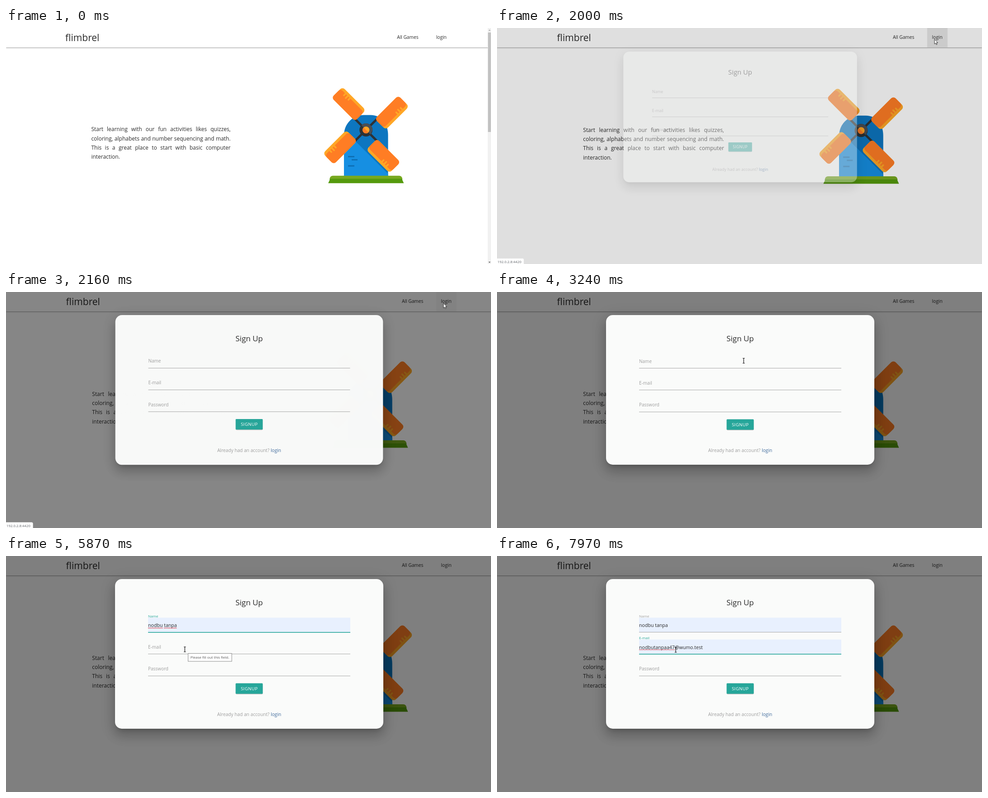
An HTML page for the animation above (8 s loop, 1072x522 px).

```html
<!DOCTYPE html>
<html lang="en">
<head>
<meta charset="utf-8">
<title>Sign up</title>
<style>
html, body { margin: 0; width: 100%; height: 100%; overflow: hidden; background: #fff; }
body { position: relative; font-family: "Open Sans", "Noto Sans", sans-serif; }
svg, #dim { position: absolute; left: 0; top: 0; width: 1072px; height: 522px; }
svg text { font-size: 10.2px; fill: #2a2a2a; white-space: pre; }
#nav {
  position: absolute; left: 0; top: 0; width: 1072px; height: 42.7px; background: #fff;
  box-shadow: 0 1.3px 1.3px rgba(0,0,0,.14), 0 2px .7px -1.3px rgba(0,0,0,.12), 0 .7px 3.3px rgba(0,0,0,.2);
}
#para div { font-size: 12px; line-height: 20.2px; color: #2a2a2a; white-space: nowrap; text-align-last: justify; }
#para div:last-child { text-align-last: left; }
#dim { background: #000; }
#modal {
  position: absolute; left: 240.5px; top: 50.5px; width: 593px; height: 331.5px;
  background: #fafbfa; border-radius: 15px;
  box-shadow: 0 16px 25px 2px rgba(0,0,0,.14), 0 6px 31px 5px rgba(0,0,0,.12), 0 7px 10px -5px rgba(0,0,0,.2);
}
#modal svg { width: 593px; height: 331.5px; }
.drop { filter: drop-shadow(0 1px 1px rgba(0,0,0,.35)); }
.drop text { font-size: 8.3px; font-weight: 600; fill: #222; }
</style>
</head>
<body>
<div id="nav"></div>
<svg viewBox="0 0 1072 522">
  <text id="brand" y="29" style="font-size:21px">flimbrel</text>
  <g id="links">
    <rect id="hover" x="940" width="45" height="42.7"/>
    <text x="864.2" y="24">All Games</text>
    <text x="950.7" y="24">login</text>
  </g>
  <foreignObject id="para" height="90">
    <div>Start learning with our fun activities likes quizzes,</div>
    <div>coloring, alphabets and number sequencing and math.</div>
    <div>This is a great place to start with basic computer</div>
    <div>interaction.</div>
  </foreignObject>
  <g id="mill">
    <path fill="#0d76c0" d="M747 328V237C747 212 766 192.5 791 192.5H806C830 192.5 844.5 212 844.5 237V328Z"/>
    <path fill="#168fe2" d="M747 262L768 246L844.5 322.5V328H747Z"/>
    <path stroke="#0d6fb5" stroke-width="3" d="M756 284.5H770M764 291.5H777M756 305H770"/>
    <rect x="715.5" y="326.7" width="160.5" height="14" rx="7" fill="#78a920"/>
    <path fill="#559a0d" d="M715.5 333.5H876V336L879.3 343.3H712.2L715.5 336Z"/>
    <g transform="translate(795.7 225.5)">
      <path stroke="#2d3236" stroke-width="5" d="M-25-25L25 25M-25 25L25-25"/>
      <g id="blades"></g>
      <circle r="14.5" fill="#2d3236"/>
      <path fill="#4b4f54" d="M-10.2-10.2A14.5 14.5 0 0 1 14.5 0L10.2 10.2Z"/>
      <circle r="7.6" fill="#ffa726"/>
      <path fill="#ff7d24" d="M-5.4-5.4A7.6 7.6 0 0 0 5.4 5.4Z"/>
    </g>
  </g>
  <g id="bar">
    <rect x="1064.7" width="8" height="522" fill="#f1f1f1"/>
    <rect x="1065.3" y="10" width="6.4" height="220" fill="#c1c1c1"/>
    <path fill="#a3a3a3" d="M1066.5 6H1071L1068.7 3.5Z"/>
    <path fill="#505050" d="M1066.5 517H1071L1068.7 519.5Z"/>
  </g>
</svg>
<div id="dim"></div>
<div id="modal">
  <svg viewBox="240.5 50.5 593 331.5">
    <text x="537" y="108.5" text-anchor="middle" style="font-size:17px">Sign Up</text>
    <g id="fields"></g>
    <rect x="507.5" y="282.5" width="59.5" height="23" rx="2" fill="#000" opacity=".22"/>
    <rect x="507" y="281" width="60" height="23.3" rx="1.5" fill="#26a69a"/>
    <text x="537.2" y="296.5" text-anchor="middle" style="font-size:9.8px;fill:#fff;letter-spacing:.33px">SIGNUP</text>
    <text x="537" y="353.7" text-anchor="middle" style="fill:#9e9e9e">Already had an account? <tspan fill="#3f6a9c">login</tspan></text>
  </svg>
</div>
<svg viewBox="0 0 1072 522">
  <g id="drops"></g>
  <g id="tip">
    <rect x="402.5" y="215.5" width="96.5" height="17.5" fill="#fff" stroke="#8a8a8a"/>
    <text x="407.7" y="227.3" style="font-size:8px;fill:#575757">Please fill out this field.</text>
  </g>
  <g id="status">
    <path d="M-1 523V509.5H56.5Q59.5 509.5 59.5 512.5V523Z" fill="#fff" stroke="#dedede" stroke-width=".7"/>
    <text x="1" y="519.8" style="font-size:7.8px;fill:#5f6368">192.0.2.8:4420</text>
  </g>
  <path id="arrow" fill="#fff" stroke="#222" stroke-width=".9" d="M0 0V10.5L2.5 8.3L4.2 12L5.8 11.2L4.2 7.6H7.4Z"/>
  <path id="beam" fill="none" stroke="#111" stroke-width="1.2" d="M-2.3-5.5H2.3M-2.3 5.5H2.3M0-5.5V5.5"/>
</svg>
<script>
const $ = id => document.getElementById(id);
const clamp = v => Math.max(0, Math.min(1, v));
const ramp = (t, from, ms) => clamp((t - from) / ms);
const show = (el, on) => el.style.display = on ? "" : "none";
const set = (el, attrs) => { for (const k in attrs) el.setAttribute(k, attrs[k]); };

const LOOP = 8000, OPEN = 1967, TEAL = "#26a69a", GREY = "#9e9e9e";
const ROW = 25.25;

// hot spot of the pointer: time, x, y
const path = [
  [370, 1009, 522], [560, 985, 300], [820, 957, 60], [1070, 957, 60], [1680, 967, 25],
  [2190, 967, 25], [2610, 590, 240], [2860, 590, 240], [3240, 545.3, 152],
  [3900, 545.3, 152], [4240, 380, 207], [4480, 380, 207], [4710, 385, 184],
  [5330, 385, 184], [5710, 395.3, 206.5], [6490, 395.3, 206.5], [6880, 395.5, 233],
  [7720, 395.5, 233], [7960, 395, 207.5]
];

// y: top of the input; words: ranges underlined by the spell checker
const fields = [
  { label: "Name", y: 136, focus: 3560, list: 3640, pick: 5020, blur: 5940, words: [[0, 5], [6, 5]],
    items: ["nodbu tanpa", "zom", "vebu", "zoma vebu", "po", "zui"] },
  { label: "E-mail", y: 184.2, focus: 5940, list: 6000, pick: 7190, blur: LOOP, words: [[0, 13]],
    items: ["nodbutanpaa47@wumo.test", "zomvebu12@wumo.test", "vebu.zom@wumo.test",
            "zui305@wumo.test", "nodbu8@wumo.test", "po.zui@wumo.test"] },
  { label: "Password", y: 232.7, focus: Infinity, list: Infinity, pick: Infinity, blur: Infinity, words: [], items: [] }
];

$("blades").innerHTML = [0, 90, 180, 270].map(a => `
  <g transform="rotate(${a}) translate(-38.2 -57.5) rotate(45)">
    <rect x="-36.5" y="-17" width="73" height="34" rx="7.5" fill="#ffa726"/>
    <rect x="-36.5" y="-11" width="73" height="28" rx="6.5" fill="#ff7d24"/>
    <path d="M-21-12V-6M-14-12V-4.5M-7-12V-6" stroke="#ffa726" stroke-width="3.6" stroke-linecap="round"/>
  </g>`).join("");

for (const f of fields) {
  $("fields").insertAdjacentHTML("beforeend", `<g>
    <rect x="313.5" y="${f.y}" width="447" height="32" fill="#e8f0fe"/>
    <rect x="313.5" width="447" y="${f.y + 31.6}"/>
    <text x="313.5"></text>
    <text x="313.5" y="${f.y + 20.8}" style="font-size:10.6px"></text>
    <path stroke="#e0242b" stroke-width="1.2" stroke-dasharray="1.6 .6"/>
    <rect y="${f.y + 9}" width="1.1" height="14"/></g>`);
  [f.fill, f.line, f.tag, f.text, f.wave, f.caret] = $("fields").lastChild.children;
  f.tag.textContent = f.label;
  $("drops").insertAdjacentHTML("beforeend", `<g class="drop" transform="translate(0 ${f.y + 33})">
    <rect x="313.5" width="135.5" height="163" rx="2" fill="#fff" stroke="#ccc" stroke-width=".6"/>
    <rect x="313.5" width="135.5" height="${ROW}" fill="#c8c8c8"/>
    ${f.items.map((s, i) => `<text x="321.8" y="${20.8 + i * ROW}">${s}</text>`).join("")}</g>`);
  f.drop = $("drops").lastChild;
  f.mark = f.drop.children[1];
}

function pointer(t) {
  const i = path.findIndex(p => p[0] > t);
  if (i < 0) return path[path.length - 1].slice(1);
  if (i === 0) return [1009, 540];
  const [a, b] = [path[i - 1], path[i]];
  let k = (t - a[0]) / (b[0] - a[0]);
  if (i > 2) k = k * k * (3 - 2 * k);
  return [a[1] + (b[1] - a[1]) * k, a[2] + (b[2] - a[2]) * k];
}

function drawPage(t) {
  const open = t >= OPEN;
  set($("brand"), { x: open ? 132.5 : 131 });
  set($("links"), { transform: `translate(${open ? 10.8 : 0})` });
  set($("para"), { x: open ? 190.3 : 188.4, y: open ? 215.9 : 214.3, width: open ? 311.5 : 308 });
  set($("mill"), { transform: open ? "translate(9.2 1.3)" : "" });
  show($("bar"), !open);
  set($("hover"), { opacity: 0.1 * ramp(t, 1480, 300) * (1 - ramp(t, OPEN, 300)) });
  $("status").style.opacity = ramp(t, 1560, 120) * (open ? 1 : 0.75) * (1 - ramp(t, 2330, 150));

  const p = ramp(t, OPEN, 250), ease = 1 - (1 - p) ** 3;
  $("dim").style.opacity = 0.5 * (1 - (1 - p) ** 2);
  $("modal").style.opacity = ease;
  $("modal").style.transform = `translateY(${-31.3 * (1 - ease)}px) scale(${0.8 + 0.2 * ease})`;
}

// returns whether the pointer is over the field's open list
function drawField(f, t, x, y) {
  const focused = t >= f.focus && t < f.blur, filled = t >= f.pick;
  const listed = t >= f.list && !filled;
  const row = Math.floor((y - f.y - 38) / ROW);
  const hot = listed && x > 313 && x < 449 && row >= 0 && row < f.items.length ? row : -1;
  const value = filled ? f.items[0] : hot >= 0 ? f.items[hot] : "";
  const up = 1 - (1 - ramp(t, f.focus, 200)) ** 2;

  show(f.fill, value);
  set(f.line, { height: focused ? 1.6 : 0.9, fill: focused ? TEAL : GREY });
  f.tag.style.fill = focused ? TEAL : GREY;
  f.tag.style.fontSize = 10 - 2 * up + "px";
  set(f.tag, { y: f.y + 20 - 21 * up });
  if (f.text.textContent !== value) f.text.textContent = value;

  show(f.wave, focused && filled);
  if (focused && filled) {
    const end = n => 313.5 + (n ? f.text.getSubStringLength(0, n) : 0);
    set(f.wave, { d: f.words.map(([a, n]) => `M${end(a)} ${f.y + 22.8}H${end(a + n)}`).join("") });
  }
  show(f.caret, focused && (!filled || (t - f.pick) % 1060 < 530));
  set(f.caret, { x: 313.5 + (filled ? f.text.getComputedTextLength() : 0) });

  show(f.drop, listed);
  show(f.mark, hot >= 0);
  set(f.mark, { y: 5 + hot * ROW });
  return listed && x < 449 && y > f.y + 33;
}

function draw(now) {
  const t = now % LOOP, [x, y] = pointer(t);
  drawPage(t);
  const overList = fields.map(f => drawField(f, t, x, y)).some(Boolean);
  show($("tip"), t >= 5870 && t < 5940);
  const typing = t > OPEN && !overList && x > 313 && x < 761 && fields.some(f => y >= f.y - 0.5 && y <= f.y + 32);
  show($("beam"), typing);
  show($("arrow"), !typing);
  for (const id of ["beam", "arrow"]) set($(id), { transform: `translate(${x} ${y})` });
  requestAnimationFrame(draw);
}
requestAnimationFrame(draw);
</script>
</body>
</html>
```
